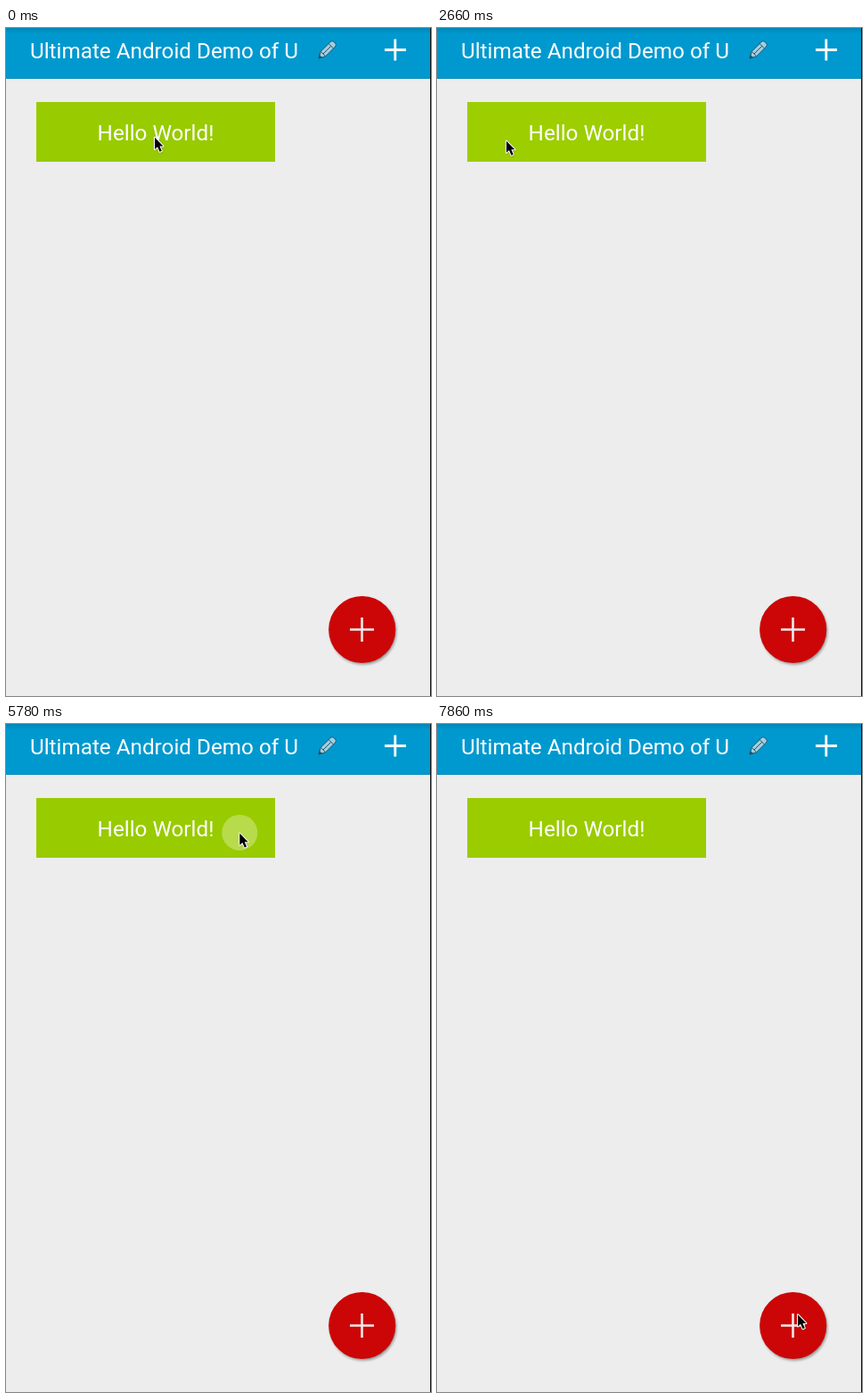
An HTML page that plays this animation: 477x749 px, repeating every 8000 ms.

```html
<!DOCTYPE html>
<html lang="en">
<head>
<meta charset="utf-8">
<title>Ripple button demo</title>
<style>
  html, body { margin: 0; width: 100%; height: 100%; overflow: hidden; background: #ededed; }
  svg { display: block; width: 477px; height: 749px; }
  text { font: 24.25px Roboto, "Open Sans", sans-serif; fill: #fff; }
  .plus { fill: none; stroke: #fff; stroke-width: 2.8; }
  .fab { stroke: #f0eaea; stroke-width: 2.6; }
</style>
</head>
<body>
<svg viewBox="0 0 477 749">
  <defs>
    <linearGradient id="bar" x1="0" y1="0" x2="0" y2="1">
      <stop offset="0" stop-color="#0086b7"/>
      <stop offset=".12" stop-color="#0099cf"/>
    </linearGradient>
    <clipPath id="clip"><rect x="34" y="83" width="268" height="67"/></clipPath>
    <filter id="blur" x="-20%" y="-20%" width="140%" height="140%">
      <feGaussianBlur stdDeviation="1.4"/>
    </filter>
    <path id="arrow" d="M0 0 V13.2 L3.1 10.4 L5.5 16 L7.8 15 L5.4 9.6 H9.4 Z"/>
  </defs>

  <rect width="477" height="749" fill="#ededed"/>
  <rect width="477" height="56" fill="url(#bar)"/>
  <rect y="56" width="477" height="1" fill="#0a8cba"/>
  <text x="27" y="34">Ultimate Android Demo of U</text>
  <g transform="translate(351 34) rotate(-45)" fill="#a0cee0" stroke="#1f4f63" stroke-width=".9" stroke-linejoin="round">
    <path d="M0 0 L7 -3.8 H22 Q25 -3.8 25 -1.5 V1.5 Q25 3.8 22 3.8 H7 Z"/>
    <path d="M7 -3.8 V3.8 M19.5 -3.8 V3.8 M7 0 H19.5" fill="none"/>
    <path d="M0 0 L3 -1.7 V1.7 Z" fill="#1f4f63"/>
  </g>
  <path class="plus" d="M425 24.5 H449 M436.8 12.5 V36.5"/>

  <rect x="34" y="83" width="268" height="67" fill="#98cb00"/>
  <g id="ripples" clip-path="url(#clip)"></g>
  <text x="168" y="126.4" text-anchor="middle">Hello World!</text>

  <circle cx="401" cy="676.5" r="37.3" opacity=".38" filter="url(#blur)"/>
  <circle cx="399.7" cy="674.5" r="37.6" fill="#cc0606"/>
  <path class="plus fab" d="M386 674.5 H413 M399.5 661 V688"/>

  <rect x="476" width="1" height="749" fill="#111"/>

  <g id="cursor" stroke-linejoin="round">
    <use href="#arrow" x=".6" y="1.4" opacity=".25" filter="url(#blur)"/>
    <use href="#arrow" stroke="#fff" stroke-width="2" paint-order="stroke"/>
  </g>
</svg>
<script>
const LOOP = 8000, FIRST = 740, TICK = 148.3, LIFE = 2400;

const taps = [
  { x: 167, y: 122, start: 653, speed: 0.13 },
  { x: 81, y: 126.5, start: 3309, speed: 0.135 },
  { x: 262.3, y: 121.8, start: 5625, speed: 0.1275 }
];

// the pointer travels from tap to tap, then to the round button
const moves = [
  { x: 60, y: 122, from: 890, to: 1560 },
  { ...taps[1], from: 1910, to: 2800 },
  { ...taps[2], from: 3600, to: 4280 },
  { x: 386, y: 696, from: 5930, to: 6600 },
  { x: 405, y: 661.5, from: 6700, to: 7700 }
];

const clamp = v => Math.min(1, Math.max(0, v));

// the glow loses its white first, then its yellow
function tint(age) {
  const heat = 1 - age / LIFE;
  const white = Math.max(0, heat - 0.6);
  return `rgb(${152 + 34 * heat},${203 + 17 * heat},${225 * white})`;
}

function pointer(t) {
  let { x, y } = taps[0];
  for (const m of moves) {
    const p = clamp((t - m.from) / (m.to - m.from));
    x += (m.x - x) * p;
    y += (m.y - y) * p;
  }
  return [x, y + 0.8];
}

const group = document.getElementById("ripples");
const cursor = document.getElementById("cursor");
const circles = taps.map(({ x, y }) => {
  const c = document.createElementNS("http://www.w3.org/2000/svg", "circle");
  c.setAttribute("cx", x);
  c.setAttribute("cy", y);
  group.append(c);
  return c;
});

function draw(now) {
  // the screen refreshes in discrete ticks
  const k = Math.floor((now % LOOP - FIRST + 12) / TICK);
  const t = k < 0 ? 0 : FIRST + k * TICK;

  taps.forEach(({ start, speed }, i) => {
    const age = t - start, r = age * speed;
    const on = r > 6 && age < LIFE;
    circles[i].setAttribute("r", on ? r : 0);
    circles[i].setAttribute("fill", on ? tint(age) : "none");
  });

  cursor.setAttribute("transform", `translate(${pointer(t)})`);
}

const begin = performance.now();
function loop() {
  draw(performance.now() - begin);
  requestAnimationFrame(loop);
}
loop();
</script>
</body>
</html>
```
